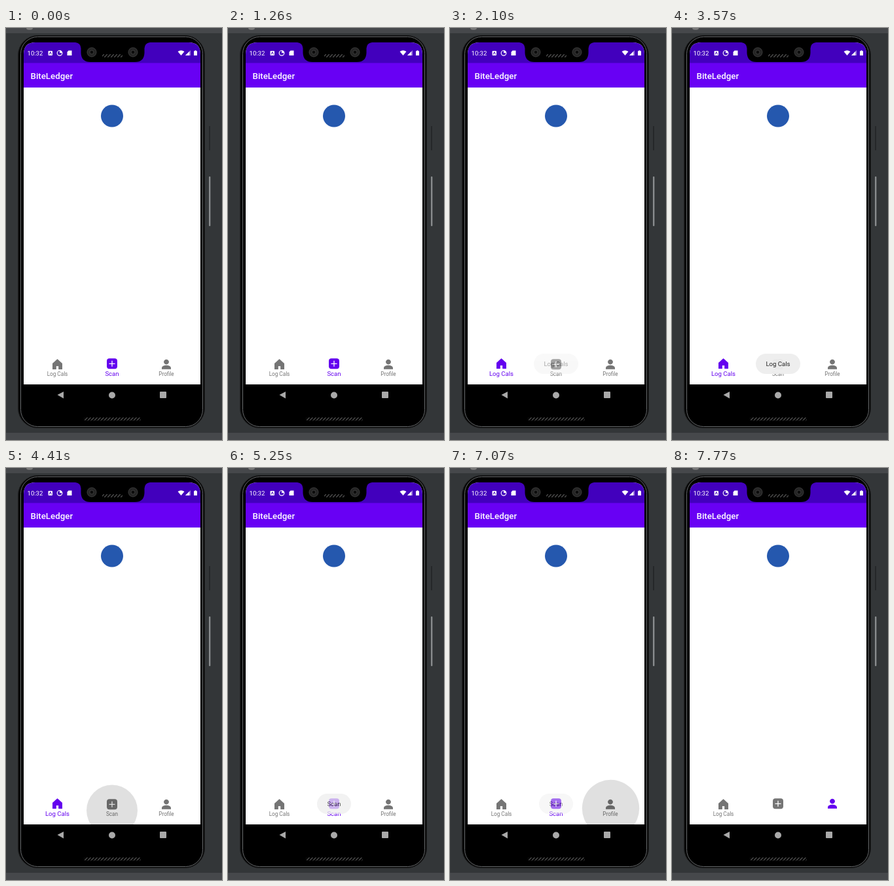
Animation, 330 px wide and 630 px high, one loop 8000 ms. Source, as an HTML page:

```html
<!DOCTYPE html>
<html lang="en">
<head>
<meta charset="utf-8">
<title>Calorie log app</title>
<style>
  html, body { margin: 0; width: 100%; height: 100%; overflow: hidden; background: #333638; }
  svg { display: block; width: 330px; height: 630px; font-family: Roboto, sans-serif; }
  .mid { text-anchor: middle; }
</style>
</head>
<body>
<svg viewBox="0 0 330 630">
  <defs>
    <clipPath id="screen"><path d="M27 545V40Q27 22 45 22H279Q297 22 297 40V545Z"/></clipPath>
    <pattern id="mesh" width="5" height="5" patternUnits="userSpaceOnUse">
      <path d="M0 5L5 0" stroke="#4b4b4b" stroke-width="1.5"/>
    </pattern>
    <path id="home" d="M0 -7.3L-6.9 -1.2V7.2H-2.3V2H2.3V7.2H6.9V-1.2Z"
      stroke="currentColor" stroke-width="1.2" stroke-linejoin="round"/>
    <g id="plus">
      <rect x="-8" y="-8" width="16" height="16" rx="4"/>
      <path d="M-4.5 0H4.5M0 -4.5V4.5" stroke="#fff" stroke-width="1.3"/>
    </g>
    <path id="person" d="M-7 7.5V5.5C-7 2.8 -3 1.4 0 1.4S7 2.8 7 5.5V7.5ZM0 -7.6a3.9 3.9 0 1 1 -.01 0Z"/>
  </defs>

  <!-- phone body -->
  <rect width="330" height="630" fill="#333638"/>
  <path d="M0 0H330V8H0ZM0 619H330V630H0Z" fill="#46484b"/>
  <path d="M31 0a5 3 0 0 0 10 0" fill="#777"/>
  <rect x="310" y="150" width="2" height="37" fill="#252729"/>
  <rect x="310" y="227" width="2.4" height="76" rx="1" fill="#888b8d"/>
  <rect x="18.5" y="11.5" width="285" height="600" rx="30" fill="#080808" stroke="#1b1c1d"/>
  <rect x="22.5" y="13.5" width="278" height="596" rx="26" fill="#000" stroke="#66696b"/>

  <!-- app screen -->
  <g clip-path="url(#screen)">
    <rect x="27" y="22" width="270" height="523" fill="#fff"/>
    <rect x="27" y="22" width="270" height="32" fill="#4200bd"/>
    <rect x="27" y="53.5" width="270" height="37.5" fill="#6800f4"/>
    <path d="M106 22Q114 23 114.500 31V38Q115 52 129 52H197Q211 52 211.500 38V31Q212 23 220 22Z" fill="#000"/>
    <text x="37.500" y="77.700" font-size="13.300" font-weight="500" fill="#fff">BiteLedger</text>
    <circle cx="162" cy="134.500" r="17" fill="#2558ae"/>
    <g id="nav"></g>
    <circle id="ripple" fill="#000"/>
    <g id="toast">
      <rect y="498" height="31" rx="15.500" fill="#eee"/>
      <text class="mid" x="162" y="517" font-size="9.600" fill="#1c1c1c"></text>
    </g>
  </g>

  <!-- status bar -->
  <g fill="#fff">
    <text x="32.500" y="41.700" font-size="9.600">10:32</text>
    <rect x="64.500" y="35" width="6.500" height="7" rx="1"/>
    <path d="M66 40.500L67.750 36.500L69.500 40.500" fill="none" stroke="#4200bd"/>
    <circle cx="82" cy="38.300" r="3.800" fill="none" stroke="#fff" stroke-width="1.200"/>
    <path d="M82 34.500A3.800 3.800 0 0 1 85.800 38.300H82Z"/>
    <path d="M93.500 36.700L95.500 34.500H100.500V42H93.500Z"/>
    <path d="M262.500 36Q267.500 32.500 272.500 36L267.500 42Z"/>
    <path d="M274 42L282 34V42Z" fill-opacity=".5"/>
    <path d="M274 42L280 36V42Z"/>
    <path d="M287 35.300H288.500V34.300H290.500V35.300H292V42H287Z"/>
  </g>

  <!-- cameras and speakers -->
  <g fill="#242424" stroke="#3b3b3b">
    <circle cx="131" cy="37" r="7"/><circle cx="194" cy="37" r="7"/>
  </g>
  <g fill="#0c0c0c" stroke="#444" stroke-width=".8">
    <circle cx="131" cy="37" r="3"/><circle cx="194" cy="37" r="3"/>
  </g>
  <rect x="147" y="40" width="31" height="5" rx="2" fill="url(#mesh)"/>
  <rect x="119" y="595.500" width="87" height="5" rx="2" fill="url(#mesh)"/>

  <!-- system buttons -->
  <g fill="#a9a9a9">
    <path d="M78.500 561L88 556V566.500Z"/>
    <circle cx="162" cy="561.500" r="5"/>
    <rect x="235" y="556" width="10" height="10" rx="1"/>
  </g>
</svg>

<script>
const LOOP = 8000, STEP = 70;
const PURPLE = '#6400ef', GREY = '#757575';
const $ = id => document.getElementById(id);
const set = (el, attrs) => { for (const k in attrs) el.setAttribute(k, attrs[k]); };
const add = (parent, tag) =>
  parent.appendChild(document.createElementNS('http://www.w3.org/2000/svg', tag));

const tabs = [
  { x: 78.5, icon: 'home', label: 'Log Cals' },
  { x: 162, icon: 'plus', label: 'Scan' },
  { x: 245, icon: 'person', label: 'Profile' }
];
for (const tab of tabs) {
  tab.use = add($('nav'), 'use');
  set(tab.use, { href: '#' + tab.icon });
  tab.text = add($('nav'), 'text');
  set(tab.text, { x: tab.x, class: 'mid' });
  tab.text.textContent = tab.label;
}

// [time, selected tab]; the two labels that swap are hidden until `shown`
const picks = [
  { at: 0, tab: 1, from: 1, shown: 0 },
  { at: 1680, tab: 0, from: 1, shown: 1750 },
  { at: 4690, tab: 1, from: 0, shown: 4760 },
  { at: 7560, tab: 2, from: 1, shown: LOOP }
];

// steps: [time, radius, opacity]
const ripples = [
  { x: 78.5, y: 521, steps: [[1400, 33, .1], [1470, 39, .12], [1540, 44, .12], [1680, 44, .09], [1750, 44, .04], [1820, 44, 0]] },
  { x: 162, y: 523.5, steps: [[4410, 39, .12], [4550, 44, .12], [4690, 44, .06], [4760, 44, 0]] },
  { x: 245.5, y: 520.5, steps: [[6930, 33, .1], [7000, 39, .12], [7070, 43.7, .12], [7770, 44, 0]] }
];

const toasts = [
  { label: 'Log Cals', w: 68, start: 1995, out: 3470, fade: 500, curve: 2 },
  { label: 'Scan', w: 52, start: 5000, out: 6860, fade: 390, curve: 1 }
];

const clamp = v => Math.min(1, Math.max(0, v));
const lastBy = (list, t, time) => list.filter(e => time(e) <= t).pop();

function drawTabs(t) {
  const pick = lastBy(picks, t, p => p.at);
  tabs.forEach((tab, i) => {
    const on = i === pick.tab;
    const hidden = t < pick.shown && (on || i === pick.from);
    const color = on ? PURPLE : GREY;
    const y = on || hidden ? 513.3 : 514.3;
    set(tab.use, { transform: `translate(${tab.x} ${y})`, fill: color, color });
    set(tab.text, {
      y: on ? 531.8 : 532,
      'font-size': on ? 9.6 : 8.2,
      fill: color,
      opacity: hidden ? 0 : 1
    });
  });
}

function drawRipple(t) {
  const ripple = lastBy(ripples, t, r => r.steps[0][0]);
  if (!ripple) return set($('ripple'), { opacity: 0 });
  const [, r, opacity] = lastBy(ripple.steps, t, s => s[0]);
  set($('ripple'), { cx: ripple.x, cy: ripple.y, r, opacity });
}

function drawToast(t) {
  const toast = lastBy(toasts, t, e => e.start);
  if (!toast) return set($('toast'), { opacity: 0 });
  const rise = 1 - (1 - clamp((t - toast.start) / 500)) ** 2;
  const fall = 1 - clamp((t - toast.out) / toast.fade) ** toast.curve;
  const [box, text] = $('toast').children;
  set($('toast'), { opacity: rise * fall });
  set(box, { x: 162 - toast.w / 2, width: toast.w });
  text.textContent = toast.label;
}

const begin = performance.now();
function frame() {
  const t = Math.floor((performance.now() - begin) % LOOP / STEP) * STEP;
  drawTabs(t);
  drawRipple(t);
  drawToast(t);
  requestAnimationFrame(frame);
}
frame();
</script>
</body>
</html>
```
